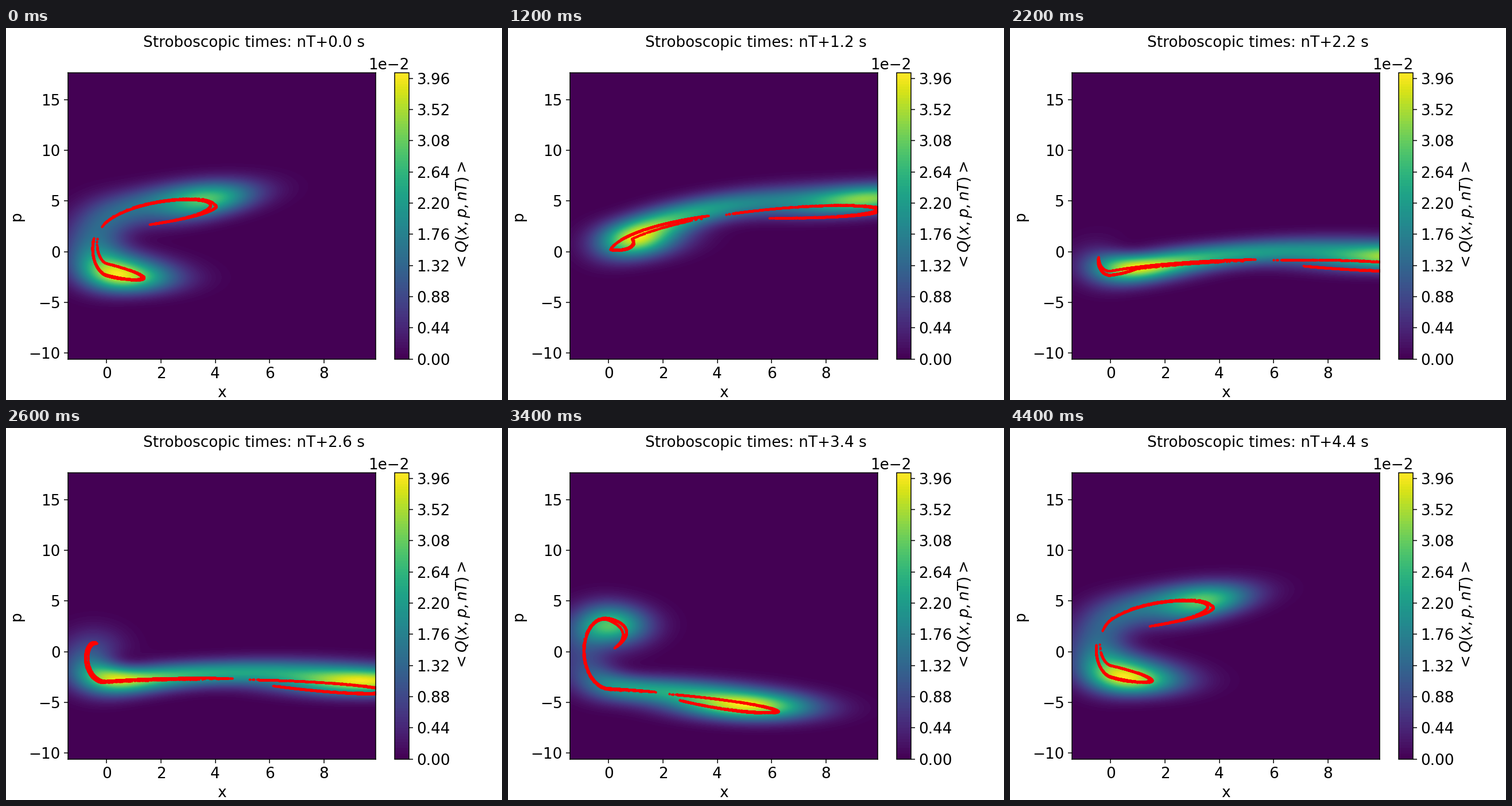
A matplotlib script for the animation above (4.5 s loop, 864 by 648 pixels).

```python
import numpy as np
import matplotlib.pyplot as plt
from matplotlib.animation import FuncAnimation

plt.rcParams.update({"font.family": "DejaVu Sans", "font.size": 14})

# Driven, damped oscillator: stiff spring for x < 0, soft spring for x > 0
STIFF, SOFT = 16.0, 0.25
GAMMA, DRIVE, OMEGA = 0.25, 4.0, 1.41
PERIOD = 2 * np.pi / OMEGA
FRAMES, DT = 45, 0.1
SPANS = [DT] * (FRAMES - 1) + [PERIOD - (FRAMES - 1) * DT]

X0, X1, P0, P1 = -1.423, 9.90, -10.6, 17.68
Q_MAX, N_LEVELS = 0.0404, 101


def drive(t):
    return DRIVE * np.cos(OMEGA * t)


def spring(x):
    return np.where(x < 0, STIFF, SOFT)


def flow(x, p, t, span, steps=4):
    """Advance classical points from t to t + span."""
    h = span / steps
    drag = GAMMA * h / 2
    for k in range(steps):
        x = x + h / 2 * p
        force = drive(t + (k + 0.5) * h) - spring(x) * x
        p = (p * (1 - drag) + h * force) / (1 + drag)
        x = x + h / 2 * p
    return x, p


def attractor_points(count=3000, settle=30):
    """Points of the strange attractor at every frame time."""
    rng = np.random.default_rng(7)
    x, p = rng.normal([[1], [-2.5]], 0.3, (2, count))

    def one_period(x, p):
        for i, span in enumerate(SPANS):
            x, p = flow(x, p, i * DT, span)
        return x, p

    for _ in range(settle):
        x, p = one_period(x, p)
    # the attractor has two bands that swap every period
    x, p = np.hstack([(x, p), one_period(x, p)])
    points = []
    for i, span in enumerate(SPANS):
        points.append((x, p))
        x, p = flow(x, p, i * DT, span)
    return points


def propagators(size, big=400, steps=2):
    """Unitary operators of each frame step, in the number basis."""
    def position(n):
        s = np.sqrt(np.arange(1, n) / 2)
        return np.diag(s, 1) + np.diag(s, -1)

    s = np.sqrt(np.arange(1, big) / 2)
    dif = np.diag(s, 1) - np.diag(s, -1)
    x, w = np.linalg.eigh(position(big))
    ham = -dif @ dif / 2 + (w * (spring(x) * x ** 2 / 2)) @ w.T
    energy, modes = np.linalg.eigh(ham[:size, :size])
    x, w = np.linalg.eigh(position(size))
    z = w.T @ modes
    result = []
    for i, span in enumerate(SPANS):
        h = span / steps
        free = (z * np.exp(-1j * energy * h)) @ z.T
        u = np.eye(size, dtype=complex)
        for k in range(steps):
            kick = np.exp(0.5j * h * drive(i * DT + (k + 0.5) * h) * x)[:, None]
            u = kick * (free @ (kick * u))
        result.append(w @ u @ w.T)
    return result


def damp(rho, span, jumps=7):
    """Photon-loss channel with rate GAMMA."""
    n = np.arange(len(rho))
    keep = np.exp(-GAMMA * span)
    root = np.sqrt(np.outer(n[1:], n[1:]))
    total, term = rho.copy(), rho
    for k in range(1, jumps + 1):
        lost = np.zeros_like(term)
        lost[:-1, :-1] = term[1:, 1:] * root * ((1 - keep) / k)
        term = lost
        total += term
    return total * keep ** (np.add.outer(n, n) / 2)


def husimi_maps(size=160, settle=8, periods=2, grid=100):
    """Husimi function of the stroboscopic state at every frame time."""
    steps = propagators(size)
    rho = np.zeros((size, size), complex)
    rho[0, 0] = 1
    states = np.zeros((FRAMES, size, size), complex)
    for n in range(settle + periods):
        for i, (u, span) in enumerate(zip(steps, SPANS)):
            if n >= settle:
                states[i] += rho / periods
            rho = damp(rho, span / 2)
            rho = damp(u @ rho @ u.conj().T, span / 2)
            rho /= np.trace(rho).real

    cell = (np.arange(grid) + 0.5) / grid
    x, p = np.meshgrid(X0 + (X1 - X0) * cell, P0 + (P1 - P0) * cell)
    alpha = ((x - 1j * p) / np.sqrt(2)).ravel()
    coherent = np.empty((grid * grid, size), complex)
    coherent[:, 0] = np.exp(-abs(alpha) ** 2 / 2)
    for k in range(1, size):
        coherent[:, k] = coherent[:, k - 1] * alpha / np.sqrt(k)

    maps = []
    for state in states:
        weight, vec = np.linalg.eigh(state)
        main = weight > 1e-4
        amp = coherent @ (vec[:, main] * np.sqrt(weight[main]))
        q = (abs(amp) ** 2).sum(axis=1).reshape(grid, grid)
        maps.append(q / q.max() * Q_MAX * 0.998)
    return maps


points = attractor_points()
maps = husimi_maps()

fig, ax = plt.subplots(figsize=(6.4, 4.8), dpi=135)
image = ax.imshow(maps[0], origin="lower", extent=(X0, X1, P0, P1),
                  aspect="auto", interpolation="bicubic",
                  cmap=plt.get_cmap("viridis", N_LEVELS), vmin=0, vmax=Q_MAX)
dots, = ax.plot([], [], "o", color="red", ms=2, mew=0)
ax.set(xlim=(X0, X1), ylim=(P0, P1), xlabel="x", ylabel="p")
ax.set_xticks(range(0, 9, 2))
ax.set_yticks(range(-10, 16, 5))

bar = fig.colorbar(image, ax=ax, ticks=np.arange(10) * 0.0044)
bar.formatter.set_powerlimits((0, 0))
bar.update_ticks()
bar.set_label("$<Q(x,p,nT)>$")
title = fig.text(0.5, 0.98, "", ha="center", va="top")


def draw(i):
    image.set_data(maps[i])
    dots.set_data(*points[i])
    title.set_text(f"Stroboscopic times: nT+{i * DT:.1f} s")
    return image, dots, title


anim = FuncAnimation(fig, draw, frames=FRAMES, interval=100,
                     repeat=True, repeat_delay=0, blit=False)
plt.show()
```
